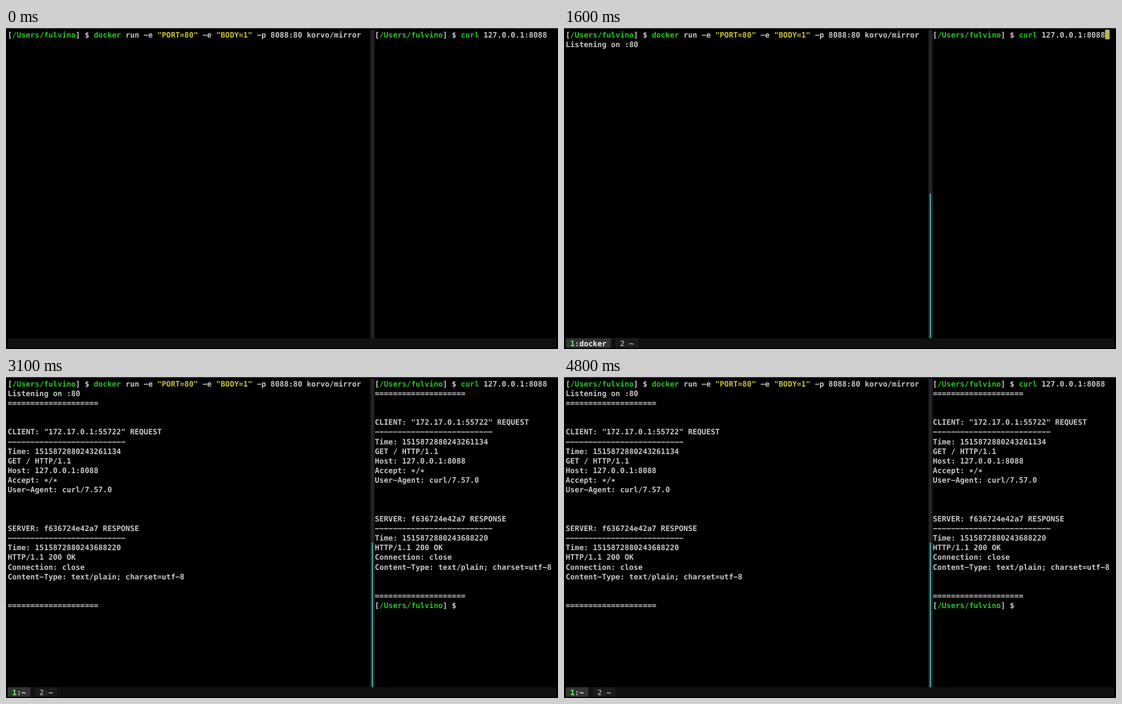
An HTML page for the animation above (5 s loop, 981 px wide and 571 px high).

```html
<!DOCTYPE html>
<html lang="en">
<head>
<meta charset="utf-8">
<title>Terminal session</title>
<style>
  html, body { margin: 0; width: 100%; height: 100%; overflow: hidden; background: #000; }
  svg { display: block; width: 981px; height: 571px; }
  text {
    font: bold 13.38px "DejaVu Sans Mono", monospace;
    white-space: pre;
    text-rendering: geometricPrecision;
    fill: #c7c7c7;
  }
  .green { fill: #22c522; }
  .yellow { fill: #c9c42e; }
  .lime { fill: #6cf26c; }
  .white { fill: #f4f4f4; }
  .tan { fill: #a39a8c; }
  .faint { fill: #3c3c3c; }
</style>
</head>
<body>
<svg id="stage" viewBox="0 0 981 571"></svg>
<script>
const LOOP = 5000;
const CELL = 8.055, ROW = 17.15, EDGE = 3, BASELINE = 13.7;
const RIGHT = 81, SPLIT = 17, STATUS = 32;
const stage = document.getElementById('stage');

const colX = col => EDGE + col * CELL;
const rowY = row => EDGE + row * ROW;

function add(parent, tag, attrs = {}) {
  const el = document.createElementNS('http://www.w3.org/2000/svg', tag);
  for (const key in attrs) el.setAttribute(key, attrs[key]);
  return parent.appendChild(el);
}

const rect = (parent, x, y, width, height, fill) =>
  add(parent, 'rect', { x, y, width, height, fill });

const cells = (parent, col, row, cols, rows, fill) =>
  rect(parent, colX(col), rowY(row), cols * CELL, rows * ROW, fill);

// Parts are plain strings or [class, string]; wide dashes and centred stars suit the terminal face.
function write(parent, col, row, ...parts) {
  const line = add(parent, 'text', { x: colX(col), y: rowY(row) + BASELINE });
  for (const part of parts) {
    const [style, words] = Array.isArray(part) ? part : ['', part];
    add(line, 'tspan', { class: style }).textContent =
      words.replace(/-/g, '\u2212').replace(/\*/g, '\u2217');
  }
}

// Makes an element visible only during the given [start, end] spans.
function show(el, ...spans) {
  const key = (time, opacity) => ({ offset: time / LOOP, opacity, easing: 'step-end' });
  const frames = [key(0, 0)];
  for (const [start, end] of spans) frames.push(key(start, 1), key(end, 0));
  if (frames[frames.length - 1].offset < 1) frames.push(key(LOOP, 0));
  el.animate(frames, { duration: LOOP, iterations: Infinity });
}

function layer(...spans) {
  const group = add(stage, 'g');
  show(group, ...spans);
  return group;
}

const cursor = (col, row, ...spans) => cells(layer(...spans), col, row, 1, 1, '#bab655');

const prompt = (parent, col, row, ...command) =>
  write(parent, col, row, '[', ['green', '/Users/fulvino'], '] $ ', ...command);

function report(parent, col, row) {
  const bar = '='.repeat(20), rule = '-'.repeat(26);
  const lines = [
    bar, '', '',
    'CLIENT: "172.17.0.1:55722" REQUEST', rule,
    'Time: 1515872880243261134',
    'GET / HTTP/1.1',
    'Host: 127.0.0.1:8088',
    'Accept: */*',
    'User-Agent: curl/7.57.0',
    '', '', '',
    'SERVER: f636724e42a7 RESPONSE', rule,
    'Time: 1515872880243688220',
    'HTTP/1.1 200 OK',
    'Connection: close',
    'Content-Type: text/plain; charset=utf-8',
    '', '', bar
  ];
  lines.forEach((line, i) => line && write(parent, col, row + i, line));
}

function tabs(parent, job) {
  const width = job.length + 4;
  cells(parent, 0, STATUS, width, 1, '#333');
  write(parent, 1, STATUS, ['lime', '1'], ':', ['white', job]);
  cells(parent, width + 1, STATUS, 5, 1, '#1b1b1b');
  write(parent, width + 2, STATUS, ['tan', '2'], ['faint', ':'], '~');
}

function divider(parent, activeRow) {
  cells(parent, 80, activeRow, 1, activeRow ? STATUS - SPLIT : SPLIT, '#1b2626');
  rect(parent, 650.3, rowY(activeRow), 1.7,
    (activeRow ? STATUS - SPLIT : SPLIT) * ROW, '#62bdbd');
}

rect(stage, 0, 0, 981, 571, '#000');
rect(stage, 0, 0, 981, 1, '#5a5a5a');
cells(stage, 0, STATUS, 121, 1, '#111');
cells(stage, 80, 0, 1, STATUS, '#1b1b1b');
rect(stage, 650.6, rowY(0), 1, STATUS * ROW, '#3d3d3d');

divider(layer([0, 1600]), 0);
divider(layer([1600, LOOP]), SPLIT);

prompt(stage, 0, 0, ['green', 'docker'], ' run -e ', ['yellow', '"PORT=80"'],
  ' -e ', ['yellow', '"BODY=1"'], ' -p 8088:80 korvo/mirror');
prompt(stage, RIGHT, 0, ['green', 'curl'], ' 127.0.0.1:8088');

write(layer([100, LOOP]), 0, 1, 'Listening on :80');

const output = layer([2400, LOOP]);
report(output, 0, 2);
report(output, RIGHT, 1);
prompt(output, RIGHT, 23);

tabs(layer([0, 100], [2400, LOOP]), '~');
tabs(layer([100, 2400]), 'docker');

cursor(0, 2, [100, 700], [1000, 1400]);
cursor(RIGHT + 38, 0, [1600, 2300]);
cursor(RIGHT + 19, 23, [2400, 3100], [3500, 3900], [4200, 4700]);
</script>
</body>
</html>
```
